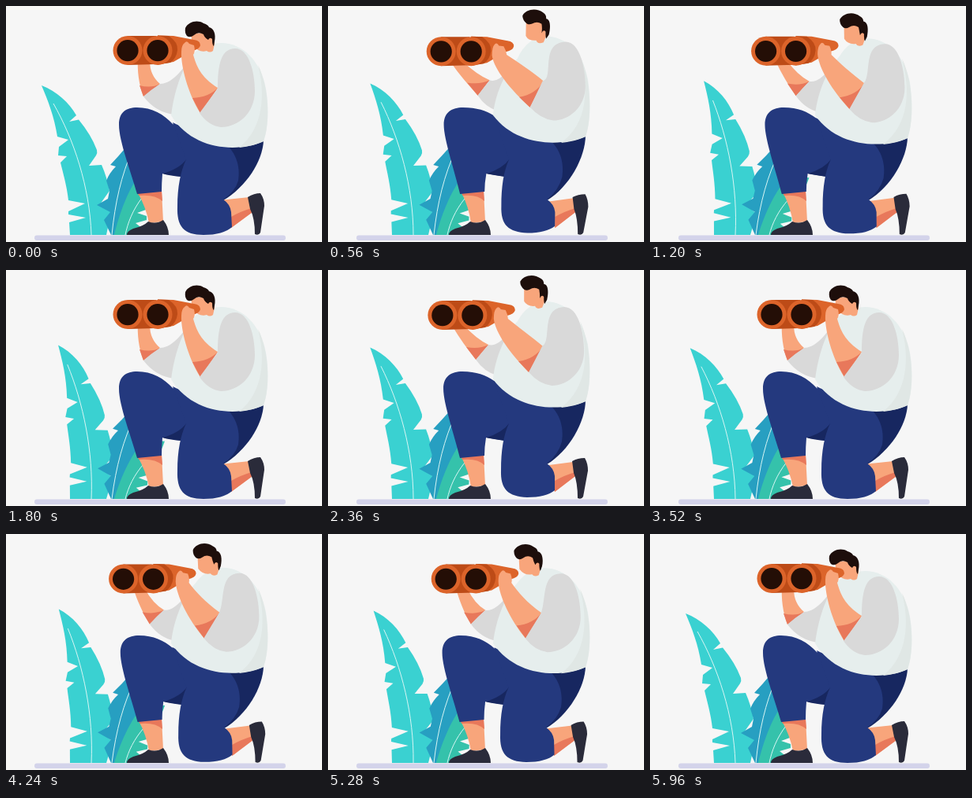
These frames come from a looping animation (400x300 px, 6 s). An HTML page:

```html
<!DOCTYPE html>
<html lang="en">
<head>
<meta charset="utf-8">
<title>Looking out</title>
<style>
html, body { margin: 0; width: 100%; height: 100%; overflow: hidden; background: #f6f6f6; }
svg { display: block; width: 400px; height: 300px; }
</style>
</head>
<body>
<svg viewBox="0 0 400 300"></svg>
<script>
const svg = document.querySelector('svg');
const SKIN = '#f8a57b', CORAL = '#e8785b', BLUE = '#24397e', NAVY = '#172760',
  GREY = '#d9d9d9', SHIRT = '#e6eeed', INK = '#2a2b3a', HAIR = '#1d0e0b',
  ORANGE = '#dc642a', RUST = '#bd4b17', LENS = '#240e06';
const parts = [];

function add(fill, a, move, stroke) {
  const el = svg.appendChild(document.createElementNS(svg.namespaceURI, 'path'));
  el.setAttribute('fill', fill);
  if (stroke) { el.setAttribute('stroke', stroke); el.setAttribute('stroke-width', 1); }
  parts.push({ el, a, move });
}

const PAIR = /(-?[\d.]+),(-?[\d.]+)/g;
const mapPath = (path, fn) => {
  let i = 0;
  return path.replace(PAIR, (_, x, y) => fn(+x, +y, i++).map(v => v.toFixed(2)).join());
};
const mix = (a, b, k) => a + (b - a) * k;

// Moves each point towards its partner in a second pose
function body(fill, a, b = a) {
  const goal = [...b.matchAll(PAIR)].map(m => [+m[1], +m[2]]);
  add(fill, a, s => (x, y, i) => [mix(x, goal[i][0], s.pose), mix(y, goal[i][1], s.pose)]);
}

// Moves a whole shape by a fixed offset
const slide = (fill, a, dx, dy) => add(fill, a, s => (x, y) => [x + dx * s.pose, y + dy * s.pose]);

// Bends a leaf around its foot, more towards the tip
function leaf(fill, outline, rib, foot, reach) {
  const bend = s => (x, y) => {
    const up = 291 - y;
    const a = reach * s.wind * Math.pow(Math.max(0, up) / 190, 0.3);
    const c = Math.cos(a), n = Math.sin(a), dx = x - foot;
    return [foot + dx * c + up * n, 291 + dx * n - up * c];
  };
  add(fill, outline, bend);
  add('none', rib, bend, '#d8f6f4');
}

const disc = (x, y, r) => {
  const k = r * 0.5523;
  return `M${x - r},${y} C${x - r},${y - k} ${x - k},${y - r} ${x},${y - r} C${x + k},${y - r} ${x + r},${y - k} ${x + r},${y} ` +
    `C${x + r},${y + k} ${x + k},${y + r} ${x},${y + r} C${x - k},${y + r} ${x - r},${y + k} ${x - r},${y}Z`;
};

// Ground and plants
body('#d3d3ea', 'M39,291.5 L351,291.5 Q354,291.5 354,294.7 Q354,298 351,298 L39,298 Q36,298 36,294.7 Q36,291.5 39,291.5Z');
leaf('#3ad1d1', 'M45,101 C64,108 80,123 89,139 L80,147 L92,144.5 Q108,164 115,183 Q116,187 114,190 L105,203 L121,202 Q128,218 131,235 L119,252 L133,262 L127,291 L81,291 L80,275 L101,269 L79,265 L79,261 L100,251 L79,247 C77,228 72,212 69,199 L77,191 L66,190 L67,179 L79,170 L65,166 C61,140 53,120 45,101Z',
  'M60,124 C86,170 106,230 108,291', 105, 0.127);
leaf('#279fc1', 'M166,166 Q150,181 143,190 L132,202 L139,204 Q131,212 127,222 L131,235 L129,245 L115,253 L132,262 L124,272 L133,291 L160,291 L170,230Z',
  'M160,183 C146,215 138,250 134,291', 140, 0.05);
leaf('#35c2ab', 'M137,291 C144,262 156,230 170,214 L195,214 C190,235 182,248 177,259 L166,263 L178,267 L178,272 L164,276 L173,283 L160,291Z',
  'M172,244 C160,260 154,276 151,291', 150, 0.12);

// Back leg
body(SKIN, 'M270,247 L308,243 L312,262 L285,282Z', 'M272,249 L310,244 L313,262 L287,282Z');
body(CORAL, 'M285,282 L312,262 L311,257 Q297,261 285,268Z', 'M287,282 L313,262 L313,257 Q299,261 287,268Z');
body(INK, 'M306,243 Q314,238 322,238 Q327,245 327,254 L322,288 Q320,292 315,290 Q315,270 309,258Z',
  'M309,243 Q316,239 325,239 Q329,246 329,255 L323,288 Q321,292 316,290 Q316,270 311,258Z');

// Front foot
body(SKIN, 'M166,236 L197,235 L199,274 L181,276 Q177,255 166,236Z', 'M168,236 L197,235 L199,274 L181,276 Q178,255 168,236Z');
body(CORAL, 'M166,236 L197,235 L198,248 Q188,239 168,241Z', 'M168,236 L197,235 L198,248 Q189,239 170,241Z');
body(INK, 'M153,291 Q153,286 161,283 Q174,280 180,274 Q190,278 199,272 Q206,281 206,291Z');

// Trousers
body(NAVY, 'M255,165 L326,171 C325,197 304,230 275,247 L255,230Z', 'M255,160 L326,165 C326,193 305,230 277,247 L257,230Z');
body(BLUE, 'M166,239 C158,210 143,172 143,151 C143,135 152,129 166,129 C185,129 200,138 211,150 L250,170 L260,215 L222,217 L198,213 Q197,225 197,236Z',
  'M167,239 C160,210 146,170 146,151 C146,135 156,129 170,129 C188,129 200,134 210,141 L250,162 L262,212 L224,217 L200,213 Q198,225 198,236Z');
body(NAVY, 'M229,194 Q220,207 198,213 Q208,216 223,217Z', 'M230,194 Q221,207 200,213 Q209,215 224,217Z');
body(BLUE, 'M211,148 C235,160 262,165 270,170 C292,182 297,205 294,222 Q290,236 275,246 Q284,252 285,262 L286,281 Q275,291 250,291 C225,291 216,280 217,255 C217,230 221,210 228,195Z',
  'M210,141 C235,155 262,160 272,166 C294,177 299,201 296,218 Q292,234 277,246 Q286,252 287,262 L287,280 Q276,289 252,289 C228,288 218,279 219,254 C219,230 222,210 229,195Z');

// Far arm
body(SKIN, 'M167,68 L182,70 Q182,88 195,99 L174,115 C168,100 166,80 167,68Z', 'M158,72 L172,70 Q188,88 203,95 L187,114 C176,100 166,86 158,72Z');
body(CORAL, 'M195,99 L174,115 L169,101 Q184,105 195,99Z', 'M203,95 L187,114 L175,98 Q191,101 203,95Z');
body(GREY, 'M174,115 Q184,106 195,99 Q212,99 232,68 L214,138 Q190,136 174,115Z', 'M187,114 Q195,104 203,95 Q214,98 228,80 L214,134 Q198,130 187,114Z');

// Shirt
body(SHIRT, 'M240,58 Q255,47 272,47 C300,47 322,70 329,105 C333,130 332,155 326,172 C295,186 237,185 209,139 C212,115 220,80 240,58Z',
  'M240,65 Q252,42 275,40 C302,40 322,62 329,95 C333,125 332,150 326,167 C295,180 239,180 209,139 C211,115 222,85 240,65Z');
body('#e0e7e5', 'M319,75 C334,105 334,150 326,172 C315,177 305,179 295,180 C327,155 328,110 319,75Z',
  'M319,65 C334,97 334,145 326,167 C315,172 305,174 295,175 C329,150 330,105 319,65Z');

// Head
body(SKIN, 'M234,35 L236,50 Q245,60 254,57 Q258,60 262,57 L264,48 L262,34Z', 'M248,20 L248,40 Q252,47 262,46 Q264,51 271,48 L274,40 L272,22Z');
body(HAIR, 'M229,38 Q226,34 227,28 C231,20 242,17 250,22 Q256,24 257,27 C263,28 266,36 264,45 L263,51 Q261,50 261,42 Q258,39 256,43 Q251,40 250,36 Q243,32 238,37 Q233,41 229,38Z',
  'M248,25 Q243,21 243,15 C247,7 260,4 269,11 Q273,13 273,18 C279,19 279,29 277,38 L274,43 Q273,42 273,34 Q270,31 268,36 Q268,30 267,25 Q261,21 255,25 Q251,27 248,25Z');

// Binoculars
const scope = (fill, path) => slide(fill, path, -9, 1);
scope(RUST, 'M154,38 L190,38 L190,74 L154,75Z');
scope(ORANGE, 'M192,37.5 L212,38 L238,43 Q246,44 246,50 Q245,55 236,57 L212,71 L192,74.5Z');
scope(RUST, 'M192,37.5 L206,38 Q218,46 217,56 Q216,66 208,72 L192,74.5Z');
for (const x of [154, 192]) {
  scope(ORANGE, disc(x, 56.5, 18.5));
  scope(LENS, disc(x, 56.7, 13.6));
}

// Near arm
body(SKIN, 'M226,47 Q229,43 232,48 L238,50 Q240,58 237,62 C241,76 246,90 268,104 L246,136 C230,111 221,75 222,58 Q222,50 226,47Z',
  'M213,49 Q216,45 219,50 L223,54 Q222,48 226,50 Q228,56 228,62 C240,72 256,84 272,97 L254,130 C231,107 212,80 210,62 Q210,52 213,49Z'.replace('L223,54 Q222,48 226,50 Q228,56 228,62', 'L225,51 Q228,57 228,62'));
body(CORAL, 'M268,104 L246,136 L236,117 Q257,116 268,104Z', 'M272,97 L254,130 L241,116 Q262,113 272,97Z');
body(GREY, 'M268,105 C268,75 272,54 290,54 C308,54 315,85 315,108 C315,135 295,154 272,154 Q256,152 245,136Z',
  'M271,97 C284,90 268,48 299,47 C317,47 324,80 324,103 C324,130 303,147 283,147 Q267,145 254,130Z');

const ease = (t, from, to) => {
  const k = Math.min(1, Math.max(0, (t - from) / (to - from)));
  return k * k * (3 - 2 * k);
};

function draw(now) {
  const t = now % 6000, beat = t % 2000;
  const state = {
    pose: 1.2 * (ease(beat, 0, 480) - ease(beat, 1020, 1505)),
    wind: (1 - Math.cos((t + 70 * Math.sin(t * Math.PI / 3000)) * Math.PI / 1500)) / 2
  };
  for (const p of parts) p.el.setAttribute('d', mapPath(p.a, p.move(state)));
  requestAnimationFrame(tick);
}
const start = performance.now();
function tick() { draw(performance.now() - start); }
tick();
</script>
</body>
</html>
```
